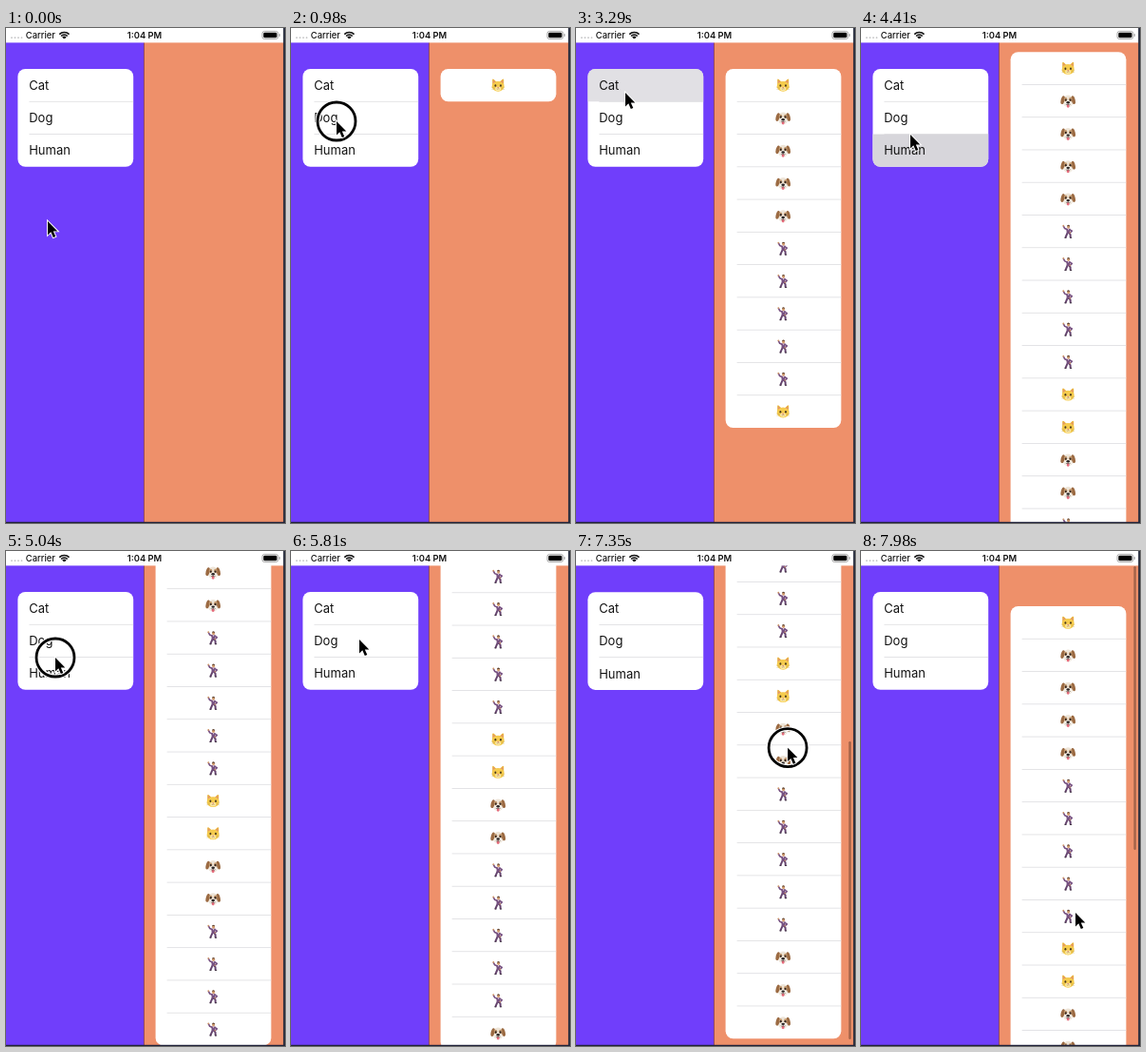
An HTML page with a canvas for the animation above (8 s loop, 294x520 px).

```html
<!DOCTYPE html>
<html lang="en">
<head>
<meta charset="utf-8">
<title>Two lists</title>
<style>
html, body { margin: 0; width: 100%; height: 100%; overflow: hidden; background: #703efb; }
canvas { display: block; width: 294px; height: 520px; }
</style>
</head>
<body>
<canvas id="stage"></canvas>
<script>
const W = 294, H = 520, LOOP = 8000, ROW = 34.27, TOP = 43, VIEW = 504;
const canvas = document.getElementById('stage');
const g = canvas.getContext('2d');
const ratio = Math.max(1, window.devicePixelRatio || 1);
canvas.width = W * ratio;
canvas.height = H * ratio;

const names = ['Cat', 'Dog', 'Human'];
// [row kind, tap times]
const taps = [
  [0, 800], [1, 1050, 1260, 1470, 1680], [2, 2030, 2200, 2370, 2540, 2710],
  [0, 3230, 3440], [1, 3900, 4080], [2, 4390, 4560, 4730, 4900, 5070], [1, 5690, 5900, 6070]
].flatMap(([kind, ...times]) => times.map(time => ({ kind, time })));

// Pointer keys: time, x, y, optional easing into the key
const fling = u => u * u;
const path = [
  [0, 44, 203], [300, 44, 203], [650, 50, 66], [810, 50, 66], [970, 48, 98], [1690, 48, 98],
  [1880, 48, 121], [2860, 48, 122], [3120, 52, 68], [3710, 52, 68], [3830, 52, 90],
  [4100, 52, 90], [4300, 52, 112], [5250, 52, 112], [5560, 72, 93], [6120, 72, 93],
  [6340, 84, 256], [6400, 84, 256], [6700, 84, 356], [6900, 84, 356], [7200, 223, 200],
  [7280, 223, 200], [7650, 226, 380, fling], [LOOP, 226, 380]
];
const pull = { from: 6400, to: 6880, y: 256 };
const drag = { from: 7280, to: 7650, y: 200 };

const clamp = u => Math.min(1, Math.max(0, u));
const smooth = u => (u = clamp(u), u * u * (3 - 2 * u));
const scrollEnd = n => Math.max(0, n * ROW - 462.6);
const rubber = d => VIEW * (1 - 1 / (d * 0.55 / VIEW + 1));

function pointer(t) {
  const i = path.findIndex(k => k[0] > t);
  const a = path[i - 1], b = path[i];
  const u = (b[3] || smooth)((t - a[0]) / (b[0] - a[0]));
  return { x: a[1] + (b[1] - a[1]) * u, y: a[2] + (b[2] - a[2]) * u };
}

function pullOffset(t) {
  if (t < pull.from) return 0;
  const d = rubber(pointer(Math.min(t, pull.to)).y - pull.y);
  return t < pull.to ? d : d * Math.exp((pull.to - t) / 80);
}

function scrollAt(t) {
  let s = 0;
  taps.forEach((tap, i) => {
    s += (scrollEnd(i + 1) - scrollEnd(i)) * smooth((t - tap.time) / 250);
  });
  if (t > drag.from) s -= pointer(Math.min(t, drag.to)).y - drag.y;
  if (t > drag.to) s -= 142 * (1 - Math.exp((drag.to - t) / 150));
  return s;
}

function rect(x, y, w, h, color) {
  g.fillStyle = color;
  g.fillRect(x, y, w, h);
}
function oval(x, y, rx, ry, color, turn = 0) {
  g.beginPath();
  g.ellipse(x, y, rx, ry, turn, 0, 7);
  g.fillStyle = color;
  g.fill();
}
function shape(d, color) {
  g.fillStyle = color;
  g.fill(new Path2D(d));
}
function line(d, color, width) {
  g.strokeStyle = color;
  g.lineWidth = width;
  g.stroke(new Path2D(d));
}
function rounded(x, y, w, h, r) {
  g.beginPath();
  g.roundRect(x, y, w, h, r);
}
function label(text, x, y, font, color = '#111') {
  g.font = font + ' Inter, Roboto, sans-serif';
  g.fillStyle = color;
  g.fillText(text, x, y);
}

function cat() {
  shape('M-6 0L-6-6Q-5.5-7.2-4.5-6.3L-1.8-3.8H1.8L4.5-6.3Q5.5-7.2 6-6L6 0Z', '#e9b23c');
  shape('M-5-2V-5.3L-2.6-3.2ZM5-2V-5.3L2.6-3.2Z', '#e58c78');
  oval(0, 1, 6.5, 5.4, '#f5cb4d');
  oval(0, 3.6, 3, 2.1, '#fbe9a8');
  for (const s of [-1, 1]) {
    oval(s * 2.8, 0.2, 0.95, 1.25, '#47391f');
    line(`M${s * 3.6} 2.7L${s * 7} 2.2M${s * 3.6} 3.6L${s * 6.7} 4.2`, '#b99a4a', 0.35);
  }
  oval(0, 2.2, 0.9, 0.6, '#d97b72');
  line('M-1.5 3.6Q-.6 4.3 0 3.2Q.6 4.3 1.5 3.6', '#8c652c', 0.5);
}

function dog() {
  oval(0, 0.2, 5.6, 6.3, '#eee5d8');
  for (const s of [-1, 1]) {
    oval(s * 5.6, -1, 1.9, 4.5, '#9b6a42', s * -0.25);
    oval(s * 2.6, -1.6, 1.8, 2.3, '#c39a70');
    oval(s * 2.4, -1.1, 0.95, 1.2, '#2d2320');
  }
  oval(0, 2.7, 3.6, 2.9, '#faf6ee');
  oval(0, 5.2, 1.4, 1.8, '#e5697b');
  oval(0, 1.6, 1.8, 1.2, '#2b2524');
  line('M0 2.5V3.6M-2.5 3.5Q-1 4.6 0 3.6Q1 4.6 2.5 3.5', '#4b3c35', 0.6);
}

function human() {
  g.lineCap = g.lineJoin = 'round';
  line('M-.3 1L-1.6 3.7L-2.6 6M1 1L2.4 3.3L2.5 6', '#66456f', 2);
  line('M-1.3-2.2L-3.5-3.2L-4.7-5.5', '#765080', 1.6);
  line('M1.8-2L4.2-.6L2.3 1.2', '#765080', 1.5);
  shape('M-1.9-3L2.4-3.1L2 2H-1.4Z', '#765080');
  shape('M-.3-3L1.2-3L.5-1Z', '#e9dce8');
  oval(-4.9, -6.1, 0.9, 0.9, '#cf9566');
  oval(2.1, 1.3, 0.8, 0.8, '#cf9566');
  oval(0.4, -4.8, 1.5, 1.8, '#d39b6c');
  shape('M-1.1-4.6Q-1.4-7 .5-7Q2.3-6.8 1.9-4.6L1.4-5.6L-.5-5.7Z', '#5f4433');
  line('M-3.3 6.5H-2.2M2.4 6.5H3.6', '#3d303f', 1);
  g.lineCap = 'butt';
}
const icons = [cat, dog, human];

// A rounded white card; fillRow draws the content of each row
function card(x, y, count, fillRow) {
  if (!count) return;
  g.save();
  rounded(x, y, 121.8, count * ROW, 8);
  g.fillStyle = '#fff';
  g.fill();
  g.clip();
  for (let i = 0; i < count; i++) {
    const top = y + i * ROW;
    if (top > H || top + ROW < 0) continue;
    fillRow(i, top);
    if (i) rect(x + 12, top - 0.4, 110, 0.8, '#dddde0');
  }
  g.restore();
}

function leftList(t) {
  card(12.4, TOP + pullOffset(t), 3, (i, top) => {
    for (const tap of taps) {
      const dt = t - tap.time;
      if (tap.kind !== i || dt < -20 || dt > 120) continue;
      rect(12, top, 123, ROW, `rgba(215,214,219,${clamp(1 - (dt - 40) / 80)})`);
    }
    label(names[i], 24.2, top + 21.9, '13px');
  });
}

function rightList(t) {
  const scroll = scrollAt(t);
  const count = taps.filter(tap => tap.time <= t).length;
  card(157.6, TOP - scroll, count, (i, top) => {
    g.save();
    g.translate(218.2, top + 17.3);
    icons[taps[i].kind]();
    g.restore();
  });
  if (t < drag.from + 20) return;
  const full = 313, over = Math.max(0, -scroll);
  rounded(287.4, 16 + Math.max(0, scroll) / 291 * (VIEW - full - 3), 2.4, full - over, 1.2);
  g.fillStyle = 'rgba(0,0,0,.32)';
  g.fill();
}

function statusBar() {
  rect(0, 0, W, 15.4, '#fff');
  for (let i = 0; i < 4; i++) oval(6 + i * 3.5, 10.2, 0.9, 0.9, '#c4c4c6');
  label('Carrier', 20.8, 11.2, '500 9.4px');
  g.textAlign = 'center';
  label('1:04 PM', 146, 11.2, '600 9.4px');
  g.textAlign = 'left';
  for (const r of [2, 4.7, 7.3]) {
    g.beginPath();
    g.arc(61.4, 11.8, r, -Math.PI * 0.75, -Math.PI * 0.25);
    g.strokeStyle = '#111';
    g.lineWidth = r === 2 ? 2.4 : 1.6;
    g.stroke();
  }
  rounded(270, 3.4, 16.8, 8.2, 2.4);
  g.strokeStyle = '#999';
  g.lineWidth = 0.8;
  g.stroke();
  rounded(271.3, 4.7, 14.2, 5.6, 1.4);
  g.fillStyle = '#000';
  g.fill();
  rect(287.7, 6.1, 1, 2.8, '#999');
}

function cursor(t) {
  const p = pointer(t);
  const held = [pull, drag].some(d => t >= d.from && t < d.to) ||
    taps.some(tap => t >= tap.time - 80 && t < tap.time - 10);
  g.save();
  g.translate(p.x, p.y);
  if (held) {
    g.beginPath();
    g.arc(0, 0, 20, 0, 7);
    g.strokeStyle = '#fff';
    g.lineWidth = 5;
    g.stroke();
    g.strokeStyle = '#000';
    g.lineWidth = 2.8;
    g.stroke();
  }
  const arrow = 'M0 0V14.4L3.3 11.3L5.8 17.1L8.3 16L5.8 10.4H10.3Z';
  g.lineJoin = 'miter';
  line(arrow, '#fff', 1.9);
  shape(arrow, '#000');
  g.restore();
}

function draw(t) {
  g.setTransform(ratio, 0, 0, ratio, 0, 0);
  rect(0, 0, W, H, '#703efb');
  rect(146, 0, 147, H, '#ee906a');
  rect(145, 15, 1, H, '#93495f');
  leftList(t);
  rightList(t);
  statusBar();
  rect(292.2, 0, 1.8, H, '#252b3c');
  rect(0, 518.8, W, 1.2, '#20223a');
  cursor(t);
}

const start = performance.now();
function frame() {
  draw((performance.now() - start) % LOOP);
  requestAnimationFrame(frame);
}
frame();
</script>
</body>
</html>
```
